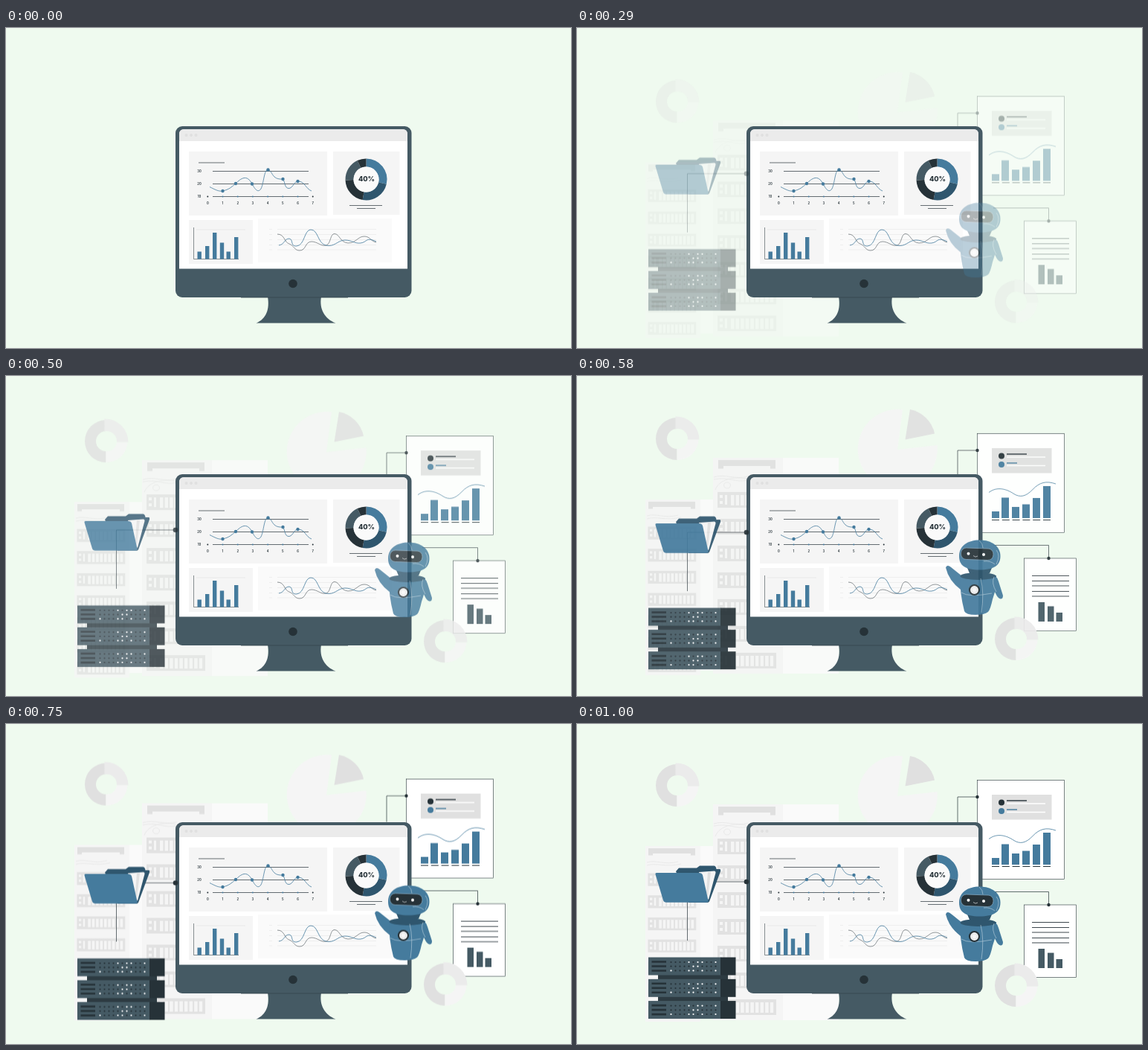
Animation of 760x430 px, one loop 1.04 s. Source, as an HTML page:

```html
<!DOCTYPE html>
<html lang="en">
<head>
<meta charset="utf-8">
<title>Dashboard</title>
<style>
  html, body { margin: 0; width: 100%; height: 100%; overflow: hidden; background: #effaef; }
  svg { display: block; width: 760px; height: 430px; }
  .up, .down {
    animation: rise 1s cubic-bezier(.36, -.01, .5, 1.38) both paused;
    animation-delay: calc(var(--t, 0) * -1ms);
  }
  .up { --from: 25.8px; }
  .down { --from: -25.8px; }
  @keyframes rise {
    from { opacity: 0; transform: translateY(var(--from)); }
    to { opacity: 1; transform: none; }
  }
  .blue { fill: #457b9d; }
  .navy { fill: #2f566e; }
  .slate { fill: #455a64; }
  .dark { fill: #263238; }
  .g1 { fill: #e0e0e0; }
  .g2 { fill: #ebebeb; }
  .g3 { fill: #f5f5f5; }
  .g4 { fill: #fafafa; }
  .white { fill: #fff; }
  .line { fill: none; stroke: #263238; stroke-width: .7; }
  .pale { fill: none; stroke: #e6e6e6; stroke-width: .8; }
  .wave { fill: none; stroke: #457b9d; stroke-width: .8; }
  .tiny { font: 600 4.2px Inter, Roboto, sans-serif; fill: #263238; text-anchor: middle; }
  .share { font: 800 9.2px Inter, "Open Sans", sans-serif; fill: #263238; text-anchor: middle; }
</style>
</head>
<body>
<svg viewBox="0 0 760 430">
  <defs>
    <g id="slot">
      <rect class="g1" width="79" height="21" opacity=".85"/>
      <g class="g3" id="slotBars">
        <rect x="3" y="4" width="4" height="4"/><rect x="3" y="12" width="4" height="4"/>
        <rect x="10" y="4" width="3" height="13"/>
      </g>
    </g>
    <g id="ring">
      <path class="g1" d="M-1 -28.5A28.5 28.5 0 0 0 -1 28.5V13.5A13.5 13.5 0 0 1 -1 -13.5Z"/>
      <path class="g3" d="M-1 28.5A28.5 28.5 0 0 0 28 1H13.5A13.5 13.5 0 0 1 -1 13.5Z"/>
      <path class="g2" d="M-3 -30A31 31 0 0 1 29 1H13.5A13.5 13.5 0 0 0 -3 -13.2Z"/>
    </g>
    <g id="server">
      <rect class="slate" width="97.5" height="24"/>
      <rect class="dark" x="97" width="20.5" height="24"/>
      <path d="M4.500 6H24M4.500 12H24M4.500 18H24" stroke="#263238" stroke-width="2.600"/>
    </g>
  </defs>

  <g class="up" id="racks">
    <rect class="g4" x="276" y="108" width="76" height="290"/>
    <rect class="g3" x="183" y="108" width="94" height="290"/>
    <path class="g1" d="M190 111H267V122.500H260V119H197V122.500H190Z"/>
    <path class="pale" d="M184 134C200 129 212 138 230 133M184 137C206 133 212 142 230 138M186 151C190 140 205 132 228 136"/>
    <ellipse class="pale" cx="202" cy="145" rx="4.500" ry="4"/>
    <rect class="g4" x="165" y="164" width="18" height="230"/>
    <rect class="g3" x="92" y="164" width="74" height="236"/>
    <path class="g1" d="M96 167H159V176.500H153V174H102V176.500H96Z"/>
    <path class="pale" d="M94 186C106 182 118 190 136 185M94 190C106 186 120 193 140 188"/>
  </g>

  <use class="ringPos" href="#ring" x="0" y="0" visibility="hidden"/>
  <g class="up">
    <g transform="translate(135.500 82.500)"><use href="#ring"/></g>
    <path class="g3" d="M431 97L438 43.300A53.500 53.500 0 1 0 484.500 91Z"/>
    <path class="g1" d="M441.500 83.500L448 43A42 42 0 0 1 481 75.500Z"/>
  </g>

  <g class="up">
    <path class="line" d="M538.500 98H512V133"/>
    <rect x="538.500" y="75.500" width="117" height="133" fill="#fff" stroke="#263238" stroke-width=".6"/>
    <circle class="dark" cx="538.500" cy="98" r="2.200"/>
    <rect class="g1" x="558" y="95" width="80.500" height="33.500"/>
    <circle class="dark" cx="571" cy="105.500" r="4"/>
    <circle class="blue" cx="571" cy="117" r="4"/>
    <path d="M578 107H630M578 118.500H630" stroke="#fff" stroke-width="1.600"/>
    <path d="M578 103H605" stroke="#263238" stroke-width="1.400"/>
    <path d="M578 115H592" stroke="#457b9d" stroke-width="1.400"/>
    <path class="wave" d="M554 154.500C565 146 578 150 587 156S604 160 613 150.500S631 138.500 644 143"/>
    <g class="blue" id="docBars"></g>
    <path d="M558 191.500H637" stroke="#263238" stroke-width="1" stroke-dasharray="10 3.800"/>
  </g>

  <g class="up">
    <path class="line" d="M634.500 243V225.500H560"/>
    <rect x="601.500" y="243" width="70" height="97.500" fill="#fff" stroke="#263238" stroke-width=".6"/>
    <circle class="dark" cx="634.500" cy="243" r="2.200"/>
    <path d="M612 266.500H662M612 273.500H662M612 280H662M612 287.500H662M612 294H662" stroke="#263238" stroke-width=".9"/>
    <path class="slate" d="M620.500 302H629V328H620.500ZM633 307.500H641.500V328H633ZM644.500 316H653V328H644.500Z"/>
  </g>
  <g class="up"><g transform="translate(591.500 351.500)"><use href="#ring"/></g></g>

  <g id="monitor">
    <path class="slate" d="M352 361C355 378 350 391 336.500 396.500H443.500C429 391 421 378 424 361Z"/>
    <rect class="slate" x="228" y="132" width="317.500" height="230" rx="9"/>
    <path d="M316 362H460" stroke="#37474f" stroke-width=".9"/>
    <path class="white" d="M233 323.500V143Q233 136 240 136H533Q540 136 540 143V323.500Z"/>
    <path class="g2" d="M233 152V143Q233 136 240 136H533Q540 136 540 143V152Z"/>
    <g class="g1"><circle cx="242.500" cy="144" r="2"/><circle cx="249" cy="144" r="2"/><circle cx="255.500" cy="144" r="2"/></g>
    <circle class="dark" cx="386" cy="343.500" r="5.800"/>

    <rect class="g3" x="246" y="166" width="186" height="86"/>
    <path class="line" d="M259 181H294M278 192.500H407M278 209.500H407M278 226.500H407"/>
    <text class="tiny" x="260" y="194">30</text>
    <text class="tiny" x="260" y="211">20</text>
    <text class="tiny" x="260" y="228">10</text>
    <path class="wave" d="M274 213.500C281 217 286 220 291.500 219C300 217 303 214 309 209C316 202 324 196 331 209.500C335 217 339 222 343 216C347 208 347 190 352.500 190.500C359 192 357 204 372 203C376 206 374 216 381 215.500C387 214 387 206 393 206C402 206 403 216 411 219"/>
    <g class="blue" id="points"></g>
    <g id="ticks"></g>

    <rect class="g3" x="440" y="166" width="89.500" height="85"/>
    <g id="donut" fill="none" stroke-width="11" transform="translate(484.500 203.500)"></g>
    <circle class="g4" cx="484.500" cy="203.500" r="17"/>
    <text class="share" x="485" y="206.300">40%</text>
    <path class="line" d="M462 238.500H506M472 242.500H497"/>

    <rect class="g3" x="246" y="258" width="86" height="59"/>
    <path class="pale" d="M256 271H322"/>
    <path class="line" d="M252.500 268V310.500H313" stroke-opacity=".75"/>
    <g class="blue" id="bars"></g>

    <rect class="g4" x="339" y="256" width="180" height="59"/>
    <path class="pale" d="M365 270.500H498M365 277.500H498M365 284.500H498M365 291.500H498M365 298H498M354 270.500H358M354 277.500H358M354 284.500H358M354 291.500H358M354 298H358" stroke-opacity=".75"/>
    <path class="line" d="M365 277C375 277 374 288 381 290C388 293 388 299 395 299C404 299 402 287 411 287C419 287 424 294 431 292C437 290 436 276 442 276.500C449 277 449 288 460 289C471 289 473 280 482 280C490 280 491 287 498 288" stroke-opacity=".7"/>
    <path class="wave" d="M367 292C375 291 374 283 381 283C387 284 382 294 391 293C402 292 401 271 410 271C420 271 419 289 430 292C442 295 446 285 456 285C465 285 469 290 477 289C486 288 484 280 498 287"/>
  </g>

  <g class="down">
    <path class="line" d="M228 212H148.500V291"/>
    <circle class="dark" cx="228" cy="212" r="3.300"/>
  </g>
  <g class="down" id="servers">
    <rect x="109" y="336" width="94" height="40" fill="#2d3b42"/>
  </g>
  <g class="down">
    <path class="navy" d="M133 198L137 193.500H161L165 190.500H184Q187 190.500 187.500 195H192Q193.500 195 193 198L178 238.500Q177 240 174 240H150Z"/>
    <path class="g3" d="M164 199L185 197.500Q187 198 186.500 200L177 236L172 232Z"/>
    <path class="g1" d="M176 199L180 198.500L176 232L174 226Z"/>
    <path class="blue" d="M107 200H164Q168 200 169 203L176.500 237Q177 239.800 174 239.800H120Q117 239.800 116 237L105.500 202Q105 200 107 200Z"/>
  </g>

  <g class="up" id="robot">
    <path class="blue" d="M496 255.500Q498 251 503 255L518 267L516 285Q500 273 496 255.500Z"/>
    <path class="blue" d="M555 264Q564 264 567 274L573 293Q573 298 569.500 297.500Q566 297 563 290L556 278Z"/>
    <path class="blue" d="M515 266H564Q565 282 559 298Q556 312 553 315Q548 319 536 319Q523 319 521 314Q515 291 515 266Z"/>
    <ellipse class="navy" cx="539.500" cy="267" rx="24" ry="5"/>
    <path class="navy" d="M525 256H558L555 263Q541 266 528 263Z"/>
    <path class="blue" d="M514 240C514 226 526 218.500 541.500 218.500C558 218.500 569.500 227 569.500 240C569.500 252 562 258.500 541 258.500C521 258.500 514 252 514 240Z"/>
    <rect x="516.500" y="229.500" width="43.500" height="15.500" rx="7" transform="rotate(2 538 237)" fill="#263238" stroke="#7fa3bb" stroke-width=".8"/>
    <circle class="white" cx="526.500" cy="236.800" r="2"/>
    <circle class="white" cx="547" cy="238" r="2"/>
    <path d="M533 239.500Q536 242.500 539 240" fill="none" stroke="#fff" stroke-width=".6"/>
    <path d="M541 219Q546 223 546 229M564 232Q570 239 564 251M547 247Q556 246 562 251M543 270Q548 290 544 316M517 289Q527 296 558 290M561 268Q557 276 564 288" fill="none" stroke="#c9dbe5" stroke-width=".55"/>
    <circle class="dark" cx="534.500" cy="285.500" r="7.600"/>
    <circle class="g3" cx="534.500" cy="285.500" r="5.400"/>
    <circle cx="534.500" cy="285.500" r="3.600" fill="none" stroke="#d5d5d5" stroke-width=".6"/>
  </g>
</svg>
<script>
  const SVG = 'http://www.w3.org/2000/svg';
  const root = document.documentElement;
  const byId = id => document.getElementById(id);

  function add(parent, tag, attrs, text) {
    const el = document.createElementNS(SVG, tag);
    for (const key in attrs) el.setAttribute(key, attrs[key]);
    if (text !== undefined) el.textContent = text;
    return parent.appendChild(el);
  }

  function addBars(id, base, width, list) {
    list.forEach(([x, y]) => add(byId(id), 'rect', { x, y, width, height: base - y }));
  }

  addBars('docBars', 189, 10, [[558, 180], [571, 161.5], [585, 174], [599, 170.5], [613, 162], [627, 146]]);
  addBars('bars', 310.5, 5.4, [[257.5, 300.5], [268, 293], [278, 275], [287.8, 288.5], [296.5, 300.5], [307, 281]]);

  [[291.5, 219], [309, 209], [331, 209.5], [352.5, 190.5], [372.5, 203], [392.5, 206]]
    .forEach(([cx, cy]) => add(byId('points'), 'circle', { cx, cy, r: 2.2 }));

  for (let i = 0; i < 8; i++) {
    const x = 271.3 + i * 20.2;
    const edge = i % 7 === 0;
    add(byId('ticks'), 'circle', { class: edge ? 'dark' : 'blue', cx: x, cy: 226.5, r: 1 });
    add(byId('ticks'), 'text', { class: 'tiny', x, y: 237.3 }, i);
  }

  const onRing = deg => {
    const a = (deg - 90) * Math.PI / 180;
    return `${22.5 * Math.cos(a)} ${22.5 * Math.sin(a)}`;
  };
  [[0, 103, '#457b9d'], [103, 190, '#2f566e'], [190, 268, '#263238'], [268, 335, '#455a64'], [335, 360, '#263238']]
    .forEach(([a, b, stroke]) => add(byId('donut'), 'path', { d: `M${onRing(a)}A22.5 22.5 0 0 1 ${onRing(b)}`, stroke }));

  for (let i = 0; i < 9; i++) add(byId('slotBars'), 'rect', { x: 18 + i * 6.6, y: 4, width: 4.4, height: 14 });
  for (let i = 0; i < 7; i++) {
    add(byId('racks'), 'use', { href: '#slot', transform: `translate(189 ${154 + i * 36})` });
    add(byId('racks'), 'use', { href: '#slot', transform: `translate(95.5 ${200.5 + i * 29.7}) scale(.82)` });
  }

  // Server lamps: 1 is lit
  ['00001011001', '00000110000', '10001101001'].forEach((row, r) => {
    [...row].forEach((lit, c) => add(byId('server'), 'circle', {
      class: lit === '1' ? 'white' : 'dark', cx: 30.5 + c * 6, cy: 6.5 + r * 5.7, r: 1.1
    }));
  });
  for (let i = 0; i < 3; i++) {
    add(byId('servers'), 'use', { href: '#server', transform: `translate(96 ${313.5 + i * 29.3})` });
  }

  // The motion runs at 24 poses a second, held on a 10 ms clock
  const LOOP = 1040, POSE = 1000 / 24, LEAD = 30;
  function tick() {
    const tens = Math.floor(performance.now() % LOOP / 10);
    const pose = Math.ceil((tens + .5) * 10 / POSE) - 1;
    root.style.setProperty('--t', pose < 3 ? 0 : pose * POSE + LEAD);
    requestAnimationFrame(tick);
  }
  tick();
</script>
</body>
</html>
```
